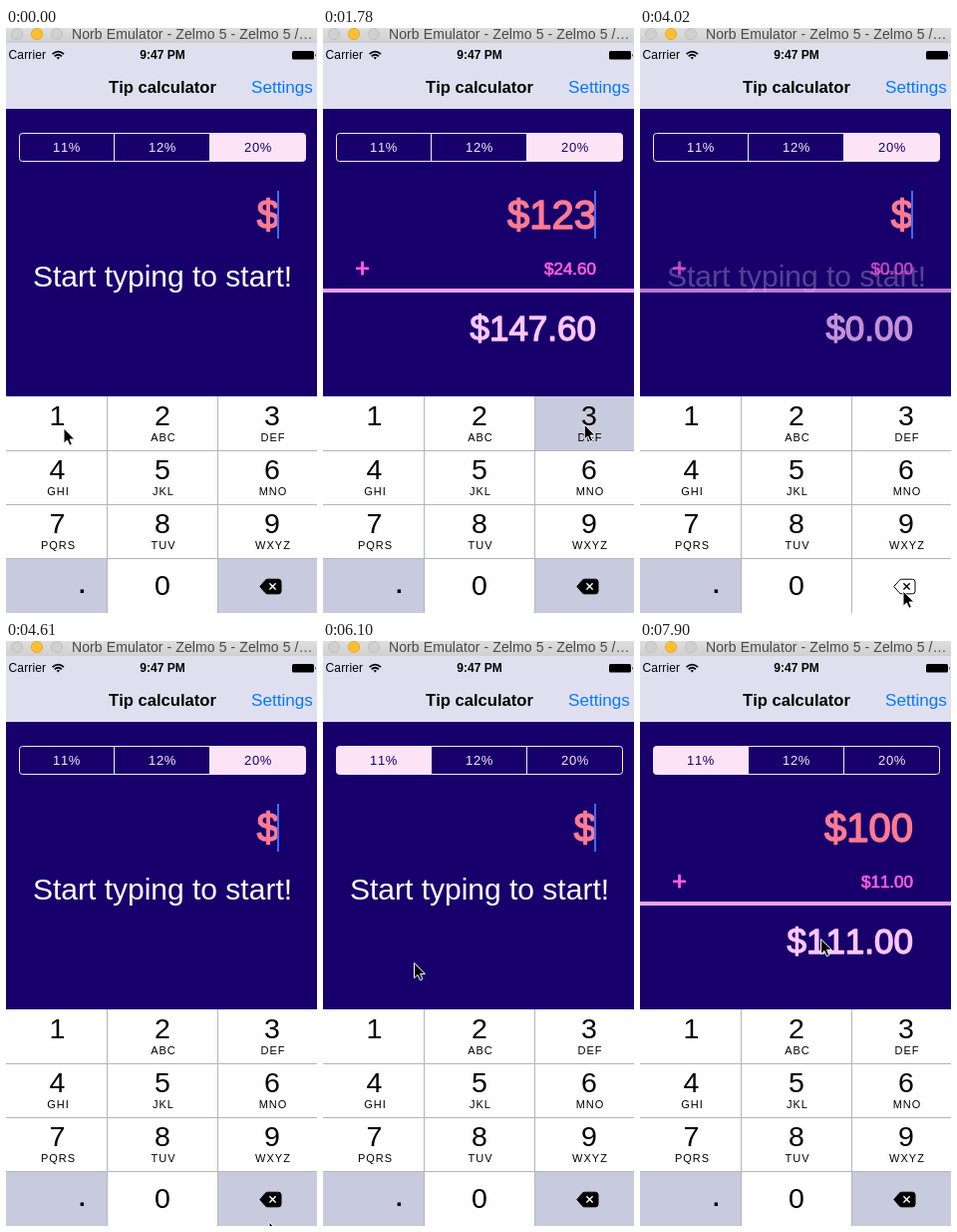
An HTML page for the animation above (8000 ms loop, 312x586 px).

```html
<!DOCTYPE html>
<html lang="en">
<head>
<meta charset="utf-8">
<title>Tip calculator</title>
<style>
html, body { margin: 0; width: 100%; height: 100%; overflow: hidden; }
svg { display: block; width: 100vw; height: 100vh; }
text { font-family: "Liberation Sans", Arial, sans-serif; font-kerning: none; white-space: pre; }
.mid { text-anchor: middle; }
.end { text-anchor: end; }
.bold { font-weight: bold; }
.medium { stroke-width: .038em; stroke-linejoin: round; }
.coral { fill: #ff7b92; stroke: #ff7b92; }
.magenta { fill: #ff5fdb; stroke: #ff5fdb; }
.rose { fill: #ffc6fb; stroke: #ffc6fb; }
</style>
</head>
<body>
<svg viewBox="0 0 312 586">
  <defs>
    <linearGradient id="chrome" x2="0" y2="1">
      <stop stop-color="#dedede"/><stop offset="1" stop-color="#d0d0d0"/>
    </linearGradient>
  </defs>
  <rect width="312" height="586" fill="#18006c"/>
  <rect width="312" height="81" fill="#e0dff0"/>
  <rect width="312" height="15" fill="url(#chrome)"/>
  <g stroke-width=".8">
    <circle cx="11" cy="6" r="5.6" fill="#d0d0d0" stroke="#bbb"/>
    <circle cx="31" cy="6" r="5.6" fill="#ffbe2e" stroke="#e3a42a"/>
    <circle cx="51" cy="6" r="5.6" fill="#d0d0d0" stroke="#bbb"/>
  </g>
  <text x="66" y="11" font-size="14" letter-spacing=".1" fill="#484848">Norb Emulator - Zelmo 5 - Zelmo 5 /…</text>

  <text x="2.5" y="31" font-size="12" letter-spacing=".15">Carrier</text>
  <g fill="none" stroke="#000" stroke-width="1.7">
    <path d="M46.6 26.2Q52.3 20.9 58 26.2M48.7 28.4Q52.3 25.1 55.9 28.4"/>
    <path d="M50.6 29.6Q52.3 28.3 54 29.6L52.3 31.4Z" fill="#000" stroke="none"/>
  </g>
  <text class="mid bold" x="157" y="31" font-size="12">9:47 PM</text>
  <rect x="287" y="23" width="22" height="8.6" rx="1.5"/>
  <path d="M310 25.6q1.5 1.6 0 3.4z"/>
  <text class="mid bold" x="157" y="65" font-size="16.6">Tip calculator</text>
  <text x="246" y="65" font-size="17.1" fill="#007aff">Settings</text>

  <g id="segments"></g>

  <text id="amount" class="end medium coral" x="274" y="201.3" font-size="40"></text>
  <rect id="caret" x="272" y="163" width="2" height="48" fill="#426bf0"/>
  <text id="hint" class="mid" x="157" y="259.2" font-size="30" fill="#fff">Start typing to start!</text>
  <g id="result">
    <text class="mid medium magenta" x="39.5" y="248.6" font-size="25">+</text>
    <text id="tip" class="end medium magenta" x="274" y="247" font-size="17"></text>
    <rect y="261" width="312" height="4" fill="#f89ff3"/>
    <text id="total" class="end medium rose" x="274" y="313.4" font-size="35"></text>
  </g>

  <g id="keys"></g>
  <path d="M0 423.5H312M0 477.5H312M0 531.5H312M101.5 369V586M212.5 369V586" stroke="#b4b5bb" fill="none"/>
  <path id="erase" d="M254.8 559.5L260 553.4Q261 552.2 262.6 552.2H273.4Q276 552.2 276 554.8V564.2Q276 566.8 273.4 566.8H262.6Q261 566.8 260 565.6Z" stroke="#000"/>
  <path id="cross" d="M264.4 556.2l6.2 6.4m0-6.4l-6.2 6.4" stroke-width="1.4"/>
  <path id="cursor" d="M0 0V15.2L3.5 12L5.9 17.3L8.4 16.2L6.1 11H10.8Z" fill="#000" stroke="#fff" stroke-width="1" stroke-linejoin="round"/>
</svg>
<script>
const $ = id => document.getElementById(id);
const LOOP = 8000, STEP = 149.2, LEAD = 20;
const WHITE = "#fefefe", GREY = "#c8cade", NAVY = "#18006c", PINK = "#fce4f6";

function add(parent, tag, attrs, text = "") {
  const el = document.createElementNS("http://www.w3.org/2000/svg", tag);
  for (const k in attrs) el.setAttribute(k, attrs[k]);
  el.textContent = text;
  return parent.appendChild(el);
}

// Segmented rate control
const shapes = [
  "M108.5 105.5H16.5Q13.5 105.5 13.5 108.5V130.5Q13.5 133.5 16.5 133.5H108.5Z",
  "M108.5 105.5H204.5V133.5H108.5Z",
  "M204.5 105.5H297.5Q300.5 105.5 300.5 108.5V130.5Q300.5 133.5 297.5 133.5H204.5Z"
];
const rates = [11, 12, 20];
const segments = rates.map((rate, i) => ({
  box: add($("segments"), "path", { d: shapes[i], stroke: PINK }),
  label: add($("segments"), "text", { x: 61 + 96 * i, y: 124, class: "mid", "font-size": 13, "letter-spacing": .6 }, rate + "%")
}));

// Keypad
const colX = [0, 101.5, 212.5, 312], midX = [51.5, 157, 267];
const letters = ["", "ABC", "DEF", "GHI", "JKL", "MNO", "PQRS", "TUV", "WXYZ"];
const keyBox = {};
[..."123456789.0<"].forEach((key, i) => {
  const col = i % 3, y = 369 + 54 * Math.floor(i / 3);
  keyBox[key] = add($("keys"), "rect", { x: colX[col], y, width: colX[col + 1] - colX[col], height: 55 });
  if (key === "<") return;
  if (key === ".") add($("keys"), "text", { x: 76.3, y: 566, class: "mid bold", "font-size": 24 }, key);
  else add($("keys"), "text", { x: midX[col], y: key === "0" ? 567.6 : y + 29.4, class: "mid", "font-size": 28.5 }, key);
  if (letters[i]) add($("keys"), "text", { x: midX[col] + 1, y: y + 45, class: "mid", "font-size": 11, "letter-spacing": 1 }, letters[i]);
});

// Timeline, in steps
const entries = [[0, ""], [2, "1"], [6, "12"], [12, "123"], [23, "12"], [25, "1"], [27, ""], [44, "1"], [47, "10"], [50, "100"]];
const presses = [[1, "1"], [5, "2"], [11, "3"], [23, "<", 1], [25, "<", 1], [27, "<", 1], [43, "1"], [46, "0"], [49, "0"]];
const path = [
  [0, 58, 401], [2, 58, 401], [5, 112, 397], [6, 114, 397], [7, 120, 396], [8, 160, 396],
  [9, 215, 396], [10, 262, 397], [19, 263, 397], [20, 263, 470], [21, 264, 545], [22, 264, 564],
  [30, 264, 564], [31, 264, 582], [32, 262, 570], [33, 250, 520], [34, 226, 420], [35, 182, 290],
  [36, 132, 185], [37, 99, 134], [38, 66, 119], [39, 58, 117], [40, 74, 200], [41, 91.5, 322.5],
  [42, 66, 390], [44, 64, 398], [45, 140, 532], [46, 152.5, 543], [51, 156, 545], [52, 184, 428], [53, 181.5, 298.5]
];

function cursorAt(n) {
  const i = Math.max(1, path.findIndex(p => p[0] >= n));
  const [a, x0, y0] = path[i - 1], [b, x1, y1] = path[i];
  const k = (n - a) / (b - a);
  return [x0 + (x1 - x0) * k, y0 + (y1 - y0) * k];
}

function resultOpacity(n) {
  if (n < 2) return 0;
  if (n < 27) return Math.min(1, (n - 1.3) / 3);
  if (n < 44) return Math.max(0, 1 - (n - 26.3) / 2.7);
  return Math.min(1, (n - 43.3) / 3);
}

function caretOpacity(n) {
  if (n === 16) return .4;
  return (n > 16 && n < 20) || (n > 33 && n < 37) || n > 52 ? 0 : 1;
}

function draw(t) {
  const n = Math.min(53, Math.floor((t + LEAD) / STEP));
  const entry = entries.filter(e => e[0] <= n).pop()[1];
  const rate = n < 39 ? 20 : 11;
  const tip = Number(entry) * rate / 100;
  $("amount").textContent = "$" + entry;
  $("tip").textContent = "$" + tip.toFixed(2);
  $("total").textContent = "$" + (Number(entry) + tip).toFixed(2);

  const shown = resultOpacity(n);
  $("result").setAttribute("opacity", shown);
  $("hint").setAttribute("opacity", 1 - shown);
  $("caret").setAttribute("opacity", caretOpacity(n));

  segments.forEach(({ box, label }, i) => {
    const on = rates[i] === rate;
    box.setAttribute("fill", on ? PINK : NAVY);
    label.setAttribute("fill", on ? NAVY : PINK);
  });

  const press = presses.find(([from, , len = 2]) => n >= from && n < from + len);
  const held = press && press[1];
  for (const key in keyBox) {
    const grey = (key === "." || key === "<") !== (key === held);
    keyBox[key].setAttribute("fill", grey ? GREY : WHITE);
  }
  $("erase").setAttribute("fill", held === "<" ? WHITE : "#000");
  $("cross").setAttribute("stroke", held === "<" ? "#000" : "#fff");

  $("cursor").setAttribute("transform", `translate(${cursorAt(n)})`);
}

function tick() {
  draw(performance.now() % LOOP);
  requestAnimationFrame(tick);
}
tick();
</script>
</body>
</html>
```
